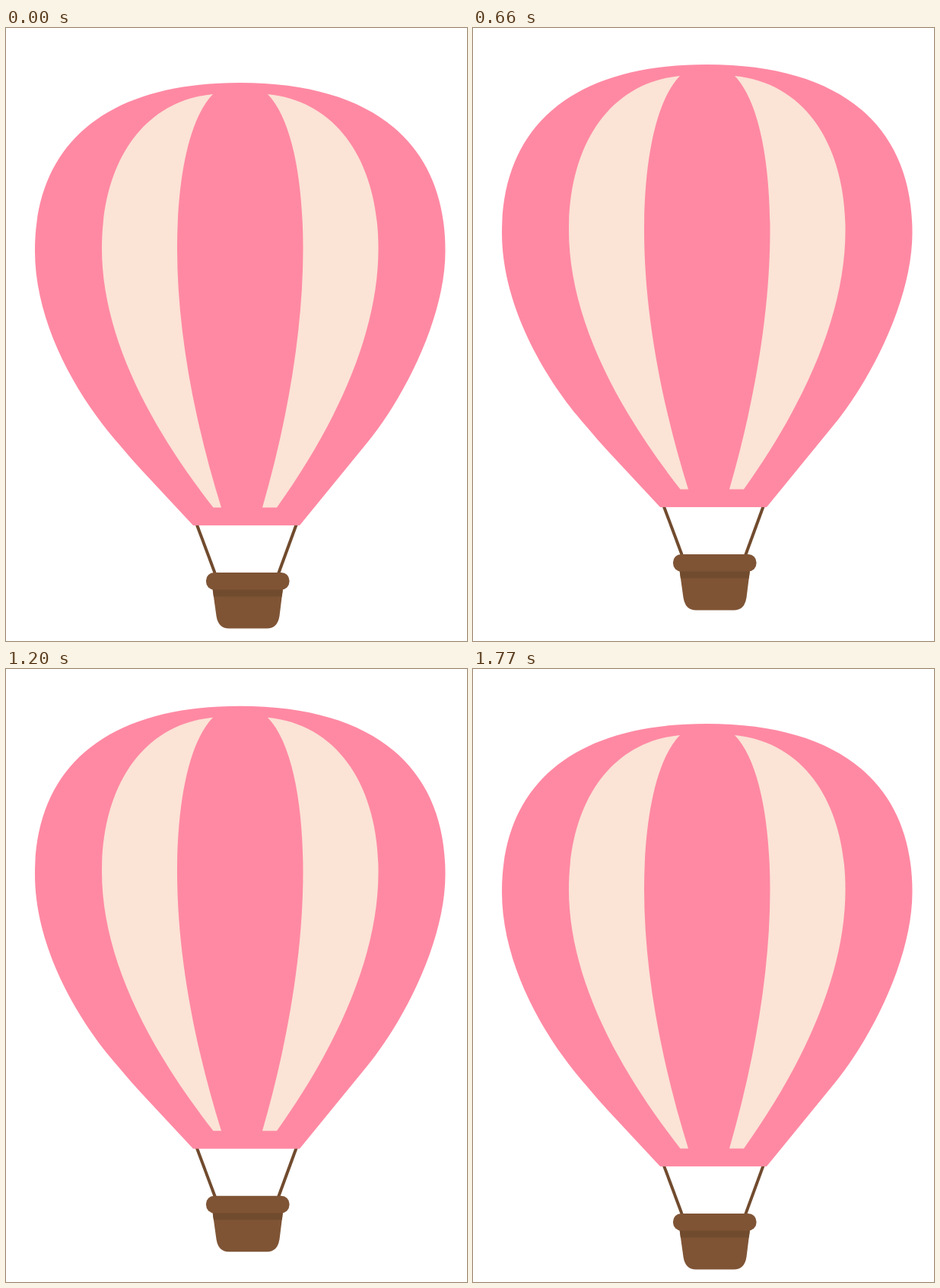
These frames come from a looping animation (606 px wide and 806 px high, 1800 ms). An HTML page:

```html
<!DOCTYPE html>
<html lang="en">
<head>
<meta charset="utf-8">
<title>Hot air balloon</title>
<style>
  html, body { margin: 0; width: 100%; height: 100%; overflow: hidden; background: #fff; }
  svg { display: block; width: 606px; height: 806px; }
</style>
</head>
<body>
<svg viewBox="0 0 606 806">
  <g id="balloon">
    <g stroke="#714b2e" stroke-width="4">
      <path d="M250.5 652L275.5 719"/>
      <path d="M382 652L357.5 719"/>
    </g>
    <path fill="#ff89a3" d="M307.5 72C485.5 72 577.5 154 577.5 293C577.5 380 524 485 475 545L386 654H246L178 581Q164 566 150 549C95 487 38 390 38 293C38 154 129.5 72 307.5 72Z"/>
    <g fill="#fbe3d6">
      <path d="M272 87C180 96 126 177 126 290C126 400 184.5 518 272.5 630.5H283C248.5 520 225 400 225 290C225 200 240 120 272 87Z"/>
      <path d="M344 87C436 96 489.5 177 489.5 290C489.5 400 436 518 356 630.5H337C369 520 390.5 400 390.5 290C390.5 200 376 120 344 87Z"/>
    </g>
    <path fill="#7f5435" d="M271.5 737H364L359.5 773Q357 789.5 343 789.5H293Q279 789.5 276.5 773Z"/>
    <path fill="#714b2e" d="M271.5 737H364L362.8 747.5H272.9Z"/>
    <rect fill="#7f5435" x="263" y="716" width="109.5" height="22.5" rx="10.5"/>
  </g>
</svg>
<script>
  const LOOP = 1800, STEP = 30, PEAK = 930, LIFT = 29.8;
  const balloon = document.getElementById("balloon");
  const start = performance.now();
  const easeSine = p => (1 - Math.cos(Math.PI * p)) / 2;

  // rise until PEAK, then sink back for the rest of the loop
  function height(t) {
    return LIFT * easeSine(t < PEAK ? t / PEAK : (LOOP - t) / (LOOP - PEAK));
  }

  function draw(now) {
    const t = Math.max(0, now - start) % LOOP;
    const held = Math.floor(t / STEP) * STEP;
    balloon.setAttribute("transform", `translate(0 ${-height(held).toFixed(2)})`);
    requestAnimationFrame(draw);
  }
  draw(start);
</script>
</body>
</html>
```
